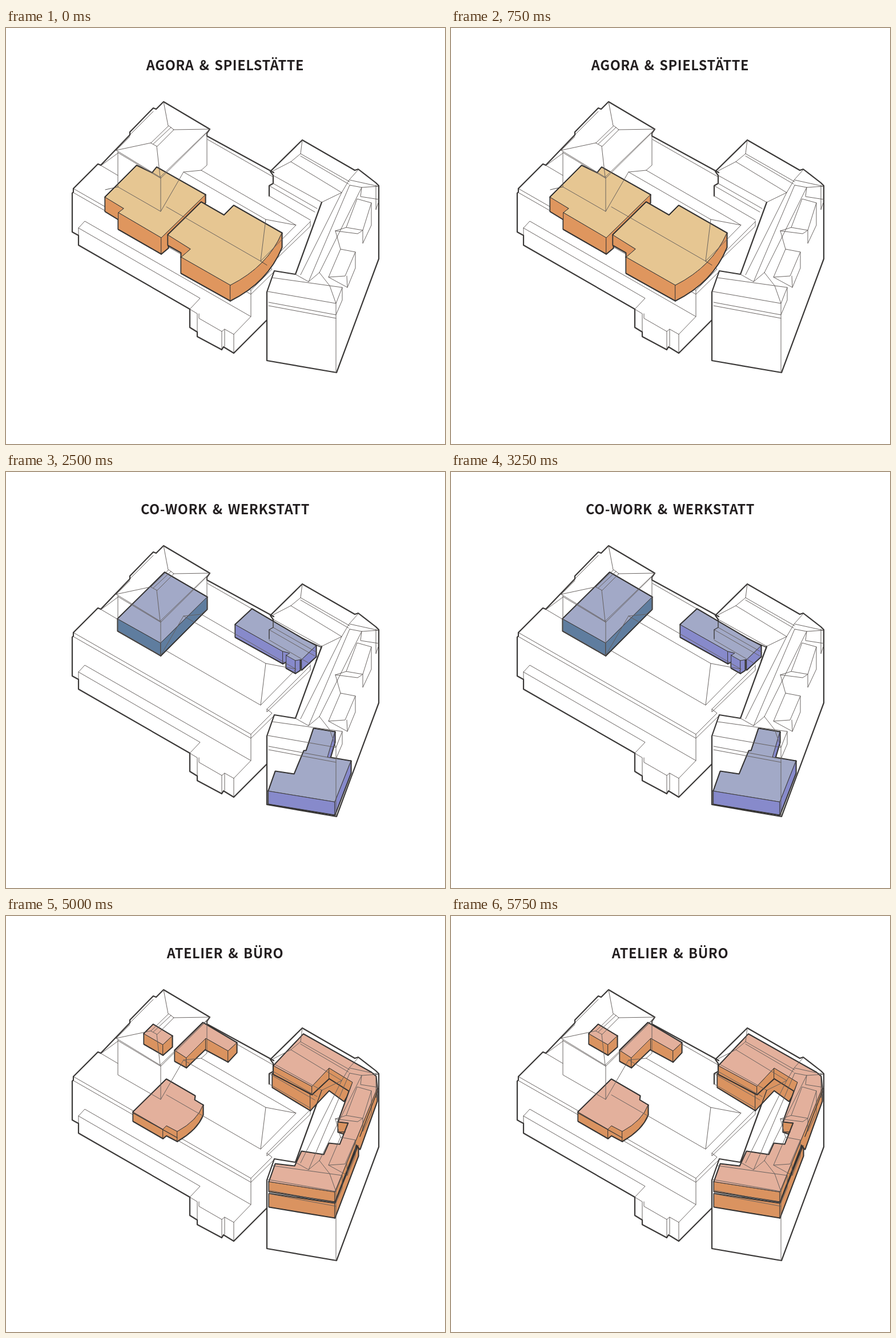
Write an HTML page that moves like this. It is 769 px wide and 728 px high and loops after 6250 ms.

```html
<!DOCTYPE html>
<html lang="de">
<head>
<meta charset="utf-8">
<title>Raumprogramm</title>
<style>
  html, body { margin: 0; width: 100%; height: 100%; overflow: hidden; background: #fff; }
  svg { display: block; width: 100%; height: 100%; }
  path { fill: none; stroke-linejoin: round; stroke-linecap: round; }
  text {
    font: 700 23.5px "Noto Sans CJK JP", "Noto Sans CJK SC", "Noto Sans", sans-serif;
    letter-spacing: .6px; word-spacing: 3px; text-anchor: middle; fill: #231f20;
  }
  .outline { stroke: #3b3938; stroke-width: 2.2; }
  .thin { stroke: #635d5b; stroke-width: .95; }
  .rim { stroke: #2e2d2d; stroke-width: 3.2; }
  .face { stroke: #3b3938; stroke-width: 1; }
</style>
</head>
<body>
<svg viewBox="0 0 769 728">
  <g id="ground"></g>
  <g id="shell"></g>
  <g id="rooms"></g>
  <g id="roofs"></g>
  <g id="marks"></g>
  <text id="title" x="384" y="74"></text>
</svg>
<script>
const HOLD = 1250;
const INK = '#3b3938';

const outline = [
  // main building
  'M469 253L352 189V184L357 177L276 129L263 142L258 140L217 182V187L166 240L161 238L118 281V287L116 289V357L127 363V380L322 492V524L335 532V540L378 563L381 558L399 569L457 511',
  // street building
  'M461 294V276L468 272V258L463 251L519 196L611 249L617 247L648 271L653 276V404L579 603L457 582V462L470 425L507 431L553 305'
];

const front = [
  'M118 281L429 459L466 422L457 415L533 339M118 288L429 466L468 428M429 459V505',
  'M127 350L138 338L429 505L399 536V569M127 350L340 473L322 492L335 500V532M127 350V363',
  'M399 536L383 527L378 531L338 508V500M378 531V563M383 527V557M457 415V420L533 347V338',
  'M353 195L467 260M162 238L196 258M166 241L196 219M217 187L258 146'
];

const roofs = [
  // tower
  'M193 214L217 190M193 214L270 261L357 177M196 218L271 263L354 181M276 129L284 171M357 177L293 178M193 214L254 201M264 207L270 261',
  'M254 201L285 171L294 178L265 207ZM258 203L289 174M196 217V278L271 321V261M352 184V240L342 249L311 252L271 321',
  // hall
  'M311 252L455 335L508 345L342 249M455 335L446 408L508 345M281 313L446 408',
  // street building
  'M519 196L516 220L602 269M468 250L499 234L588 288M499 234L516 220M516 224L600 273M617 248L601 266L588 288L553 305L468 258',
  'M468 272L545 316M461 276L541 322M461 294L533 336M602 275L530 444M588 288L516 432M623 279L549 428L530 444L507 431M602 266L652 277L623 279L602 275M653 300L621 295L623 279',
  'M467 437L567 451L549 428M458 461L578 482L567 451L589 454L578 482V603M460 480L578 502L589 476V454M460 486L578 508',
  // dormers
  'M577 355L596 349L625 354L640 306L615 299L596 349M577 355L616 360L625 354V377L640 345V306M577 355L586 387M565 436L594 434L612 392L586 387L565 436L598 454L612 420V392M598 454L597 434M648 275V318L652 306'
];

// A volume is a list of faces: "t" top, "w" wall, "d" dark wall, "o" open court.
const scenes = [
  {
    title: 'AGORA & SPIELSTÄTTE', t: '#e6c692', w: '#df965e',
    volumes: [
      [
        'w174 296L206 316L197 323V335L174 321',
        'w197 323L272 367V395L197 352',
        'w272 367L349 292V306L284 364V385L272 395',
        't174 296L229 241L256 254L264 244L349 292L272 367L197 323L206 316'
      ],
      [
        'w284 362L323 387L307 401V393L284 380',
        'w307 401L393 450V477L307 429',
        'w393 450Q458 417 483 359V384Q458 445 393 477',
        't284 362L342 305L382 328L399 311L483 359Q458 417 393 450L307 401L323 387'
      ]
    ],
    marks: 'M174 283L196 278M457 415L446 408'
  },
  {
    title: 'FOYER & PIAZZA', t: '#e8cebb', w: '#e3bea2',
    ground: 'M116 359L69 403L549 684L579 604L457 582V511L399 569L381 558L378 563L335 540V532L322 524V492L127 380V363ZM63 410L546 692L543 699L56 417ZM51 422L541 706L538 713L45 429Z',
    volumes: [
      [
        'w376 291L469 343V363L376 312',
        't376 291L398 271L496 328L478 348'
      ],
      [
        'w309 432L386 474V490L309 453',
        't309 432L330 415L407 458L386 476'
      ],
      [
        'w532 384V403L423 511L378 556L370 560V535L423 487',
        't342 519L372 537V560L342 543',
        't342 519L385 480L407 487L443 465L500 408L532 384L423 490L372 537'
      ],
      [
        'w542 333V356L441 458L407 486V465',
        'w510 383L542 354V376L524 393',
        'w458 318L497 343L480 360L458 342',
        'w342 430L407 465V486L342 449',
        't342 430L362 411L403 433L497 344L458 320L480 297L542 333L536 347L432 446L407 465'
      ]
    ],
    marks: 'M336 538L342 543V522L371 538V560L378 556M346 545V530L367 542V557M458 461L470 425L507 431L553 305M430 446L441 452V470L420 488V507L427 510M498 377L512 384'
  },
  {
    title: 'CO-WORK & WERKSTATT', t: '#a2a9c7', w: '#878acb',
    volumes: [
      [
        'd196 257L271 299V321L196 278',
        'd271 299L352 219V240L271 321',
        't196 257L278 176L352 219L271 299'
      ],
      [
        'w402 267L485 314V335L402 289',
        'w485 314L497 317V329L485 335',
        'w491 320L507 329V352L491 343',
        'w507 329L515 326V347L507 352',
        'w518 328L543 304V323L518 346',
        't402 267L431 240L518 291L543 304L518 328L507 330L491 321L497 317L485 314'
      ],
      [
        'w576 455V473L568 500L563 499',
        'w460 558L576 577V600L460 581',
        'w576 577L604 506V527L576 600',
        't460 558L472 524L505 529L522 488H526L539 449L576 455L563 499L604 506L576 577'
      ]
    ],
    marks: 'M463 251L468 258V272L461 276V292M518 291L553 307L543 330'
  },
  {
    title: 'BELEGTE RÄUME', t: '#a0c2ce', w: '#6ca6b9',
    volumes: [
      [
        'w464 303L551 351L539 390L508 370L528 341L488 318L464 325',
        'w460 510L574 528V574L458 555',
        'w574 528L650 326V376L574 574',
        't464 303L519 248L648 322L650 326L574 528L460 510L472 476L502 480L551 351'
      ],
      [
        'w122 341L276 430V445L122 357',
        'w276 430L298 411V424L276 445',
        't237 387L247 380L298 411L276 430L237 407'
      ],
      [
        'w122 320L237 387V405L122 339',
        'w237 387L247 380V398L237 405'
      ],
      [
        'w122 301L308 408V424L122 317',
        'w308 408L322 398V412L308 424'
      ],
      [
        'w273 262L365 311V327L273 279',
        'w365 311L400 280L408 290L365 327',
        'w273 262V279L248 306L236 302',
        't187 255L231 207L300 230L400 283L365 311L273 262L236 303L197 282',
        'o184 253L231 207L245 216L202 259',
        'o303 262L314 251L341 267L328 279'
      ],
      [
        'w172 248L231 190V207L184 253',
        'w231 190L268 210L275 203V218L268 225L231 207',
        'w275 203L341 239L330 250V258L275 218',
        'w330 250L386 281L397 268V283L386 294L330 264',
        'w397 268L452 295V309L397 283',
        'w452 295L475 273V290L452 309',
        'w311 353L325 335V351L318 357',
        'w122 283L427 458V471L122 298',
        'w427 458L462 421V435L427 471',
        'w455 415L528 341V353L460 419',
        't122 283L258 147L475 273L452 295L397 268L386 281L330 250L341 239L275 203L268 210L231 190L172 248L204 269V285L268 320L280 308L325 335L311 353L403 406L488 318L528 341L455 415L462 421L427 458'
      ]
    ],
    marks: 'M458 530L574 549L650 352M458 533L574 552L650 355'
  },
  {
    title: 'ATELIER & BÜRO', t: '#e3b09c', w: '#da9360',
    volumes: [
      [
        'w242 206L275 225V243L242 224',
        'w275 225L291 210V229L275 243',
        't242 206L258 190L291 210L275 225'
      ],
      [
        'w296 235L316 248V265L296 254',
        'w316 248L350 214V232L316 265',
        'w350 214L389 236V255L350 234',
        'w389 236L404 222V239L389 255',
        't296 235L345 187L404 222L389 236L350 214L316 248'
      ],
      [
        'w223 343L275 373V389L223 359',
        'w275 373L281 367L300 377V394L281 384L275 389',
        'w300 377Q335 358 345 331V348Q335 374 300 394',
        't223 343L281 286L331 315L330 322L345 331Q335 358 300 377L281 367L275 373'
      ],
      [
        'w467 276L533 312V340L467 300',
        'w533 312L566 284L604 304L592 324L566 305L533 340',
        'w461 486L576 503V528L461 509',
        'w576 503L617 400V420L576 528',
        'w582 360L600 362L594 382L582 378'
      ],
      [
        'w469 262L536 298V312L469 277',
        'w536 298L566 266V284L536 312',
        'w566 266L607 291L601 306L566 284',
        'w461 465L576 483V500L461 482',
        'w576 483L650 302V324L620 408L614 400L576 500',
        't469 262L521 207L640 274L648 281L650 302L576 483L461 465L472 434L506 438L518 412L557 418L566 398L585 400L600 362L582 360L607 291L566 266L536 298'
      ]
    ],
    marks: 'M223 345L300 388M507 431L553 305M583 378H594M576 503L617 402M620 386L650 308'
  }
];

const $ = id => document.getElementById(id);
const path = (d, cls, fill = 'none') => `<path d="${d}" class="${cls}" style="fill:${fill}"/>`;
const paths = (list, cls) => list.map(d => path(d, cls)).join('');

function drawVolume(faces, scene) {
  const tones = { t: scene.t, w: scene.w, d: '#5f7d9f', o: '#fff' };
  const parts = faces.map(f => ['M' + f.slice(1) + 'Z', tones[f[0]]]);
  return parts.map(([d]) => path(d, 'rim')).join('') +
    parts.map(([d, tone]) => path(d, 'face', tone)).join('');
}

$('shell').innerHTML = paths(front, 'thin') + paths(outline, 'outline');
$('roofs').innerHTML = paths(roofs, 'thin');

let shown = -1;

function render(time) {
  const index = Math.floor(time / HOLD) % scenes.length;
  if (index === shown) return;
  shown = index;
  const scene = scenes[index];
  $('title').textContent = scene.title;
  $('ground').innerHTML = scene.ground ? `<path d="${scene.ground}" style="fill:#e9d0bf"/>` : '';
  $('rooms').innerHTML = scene.volumes.map(v => drawVolume(v, scene)).join('');
  $('marks').innerHTML = `<path d="${scene.marks}" stroke="${INK}" stroke-width="${index ? 1.4 : .9}"/>`;
}

const start = performance.now();
function tick() {
  render(performance.now() - start);
  requestAnimationFrame(tick);
}
tick();
</script>
</body>
</html>
```
